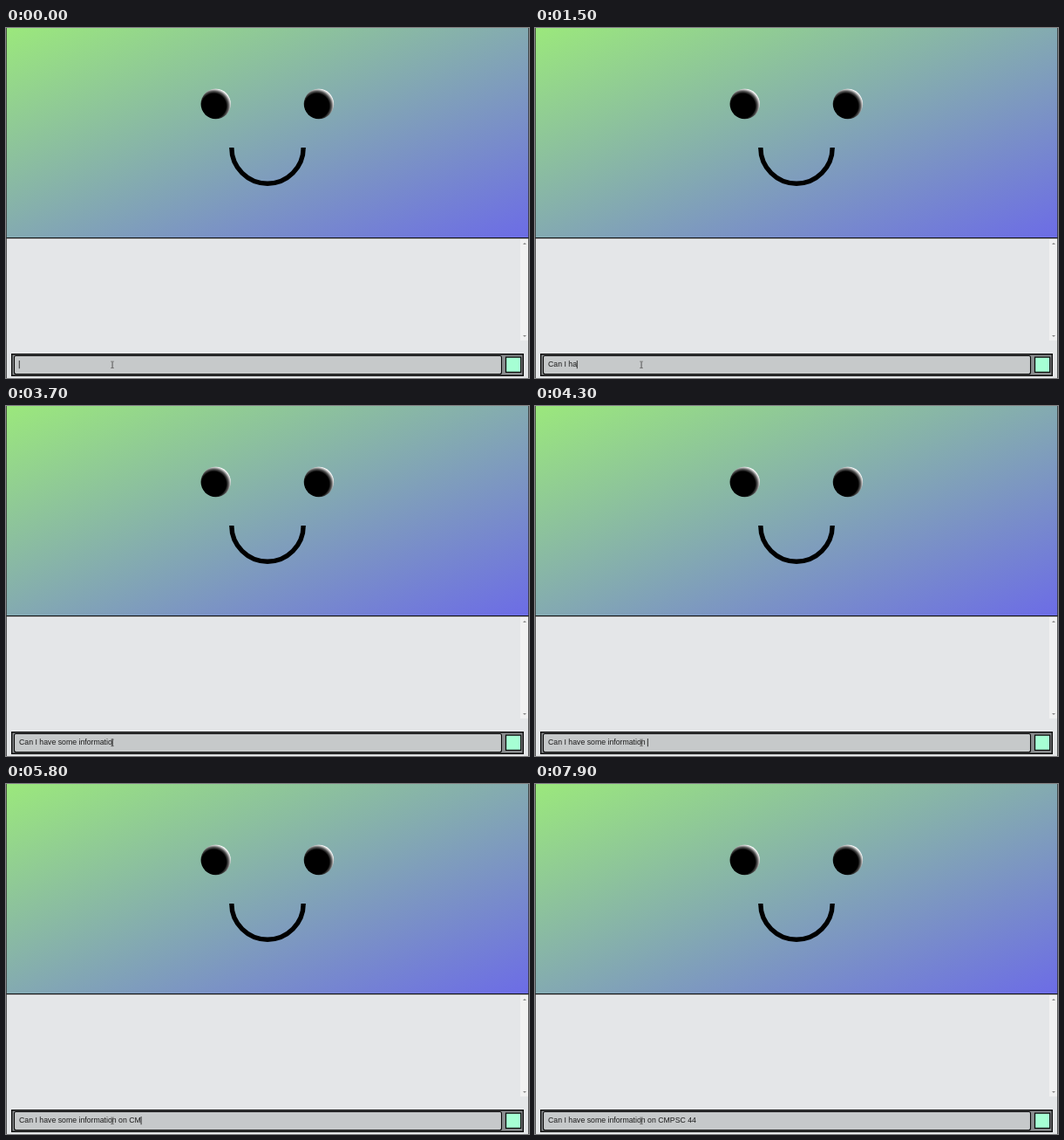
Animation of 600 by 401 pixels, one loop 8000 ms. Source, as an HTML page with a canvas:

```html
<!DOCTYPE html>
<html lang="en">
<head>
<meta charset="utf-8">
<title>Chat face</title>
<style>
html, body { margin: 0; width: 100%; height: 100%; overflow: hidden; background: #e4e6e8; }
canvas { display: block; }
</style>
</head>
<body>
<canvas id="stage" width="600" height="401"></canvas>
<script>
const ctx = document.getElementById('stage').getContext('2d');
const LOOP = 8000;
const BLINK = 500;
const MESSAGE = 'Can I have some information on CMPSC 44';
const TEXT_X = 15;

// Key press times in tenths of a second, one per character.
const KEYS = [
  4, 7, 8, 10, 11, 12, 14, 15, 16, 17, 18, 19, 20, 21, 22, 23, 24, 25, 26, 27,
  28, 32, 33, 35, 36, 37, 38, 40, 44, 50, 54, 57, 58, 59, 61, 64, 69, 71, 73
].map(k => k * 100);

function rect(x, y, w, h, color) {
  ctx.fillStyle = color;
  ctx.fillRect(x, y, w, h);
}

function box(x, y, w, h, radius, fill, line) {
  ctx.beginPath();
  ctx.roundRect(x, y, w, h, radius);
  ctx.fillStyle = fill;
  ctx.fill();
  ctx.strokeStyle = '#080808';
  ctx.lineWidth = line;
  ctx.stroke();
}

function eye(x, y) {
  const shade = ctx.createRadialGradient(x - 2.3, y + 2.3, 14.2, x - 2.3, y + 2.3, 20);
  shade.addColorStop(0, '#000');
  shade.addColorStop(0.45, '#555');
  shade.addColorStop(1, '#fff');
  ctx.beginPath();
  ctx.arc(x, y, 17.2, 0, Math.PI * 2);
  ctx.fillStyle = shade;
  ctx.fill();
}

function drawFace() {
  const sky = ctx.createLinearGradient(217.2, -87, 382.8, 327);
  sky.addColorStop(0, '#9be87c');
  sky.addColorStop(1, '#6c6ce6');
  rect(0, 0, 600, 240, sky);

  eye(240.7, 87);
  eye(358.9, 87);

  ctx.beginPath();
  ctx.arc(300, 137, 41.2, 0, Math.PI);
  ctx.strokeStyle = '#000';
  ctx.lineWidth = 5.4;
  ctx.stroke();
}

function arrow(y, dir) {
  ctx.beginPath();
  ctx.moveTo(593, y + dir);
  ctx.lineTo(597, y + dir);
  ctx.lineTo(595, y - dir);
  ctx.fillStyle = '#888';
  ctx.fill();
}

function drawPanel() {
  rect(0, 240, 600, 161, '#e4e6e8');
  rect(590, 242, 9, 116, '#f1f1f1');
  arrow(247, 1);
  arrow(353, -1);
  rect(0, 240, 600, 1.2, '#111');
  rect(0, 0, 0.8, 401, '#333');
  rect(599.2, 0, 0.8, 401, '#333');

  box(6.7, 373.7, 586.6, 24.6, 0, '#8b8e90', 1.4);
  box(9.5, 375.5, 559, 21, 2, '#c6c9ca', 1.1);
  box(573.5, 377.2, 17.2, 17.2, 0, '#a6ffd4', 1.2);
}

function drawPointer(x, y) {
  rect(x - 0.4, y - 3, 0.9, 7, '#444');
  rect(x - 1.8, y - 3.8, 3.6, 0.8, '#666');
  rect(x - 1.8, y + 3.6, 3.6, 0.8, '#666');
}

function drawInput(t) {
  const count = KEYS.filter(k => k <= t).length;
  const typed = MESSAGE.slice(0, count);
  const idle = t - (count ? KEYS[count - 1] : 0);

  ctx.font = '8.74px "Liberation Sans", Arial, sans-serif';
  ctx.fillStyle = '#1c1c1c';
  ctx.fillText(typed, TEXT_X, 388.2);

  if (idle % (2 * BLINK) < BLINK) {
    rect(TEXT_X + ctx.measureText(typed).width - 0.2, 381, 0.9, 9.2, '#222');
  }
  drawPointer(122, 385.5);
}

function frame(now) {
  drawFace();
  drawPanel();
  drawInput(now % LOOP);
  requestAnimationFrame(frame);
}
requestAnimationFrame(frame);
</script>
</body>
</html>
```
